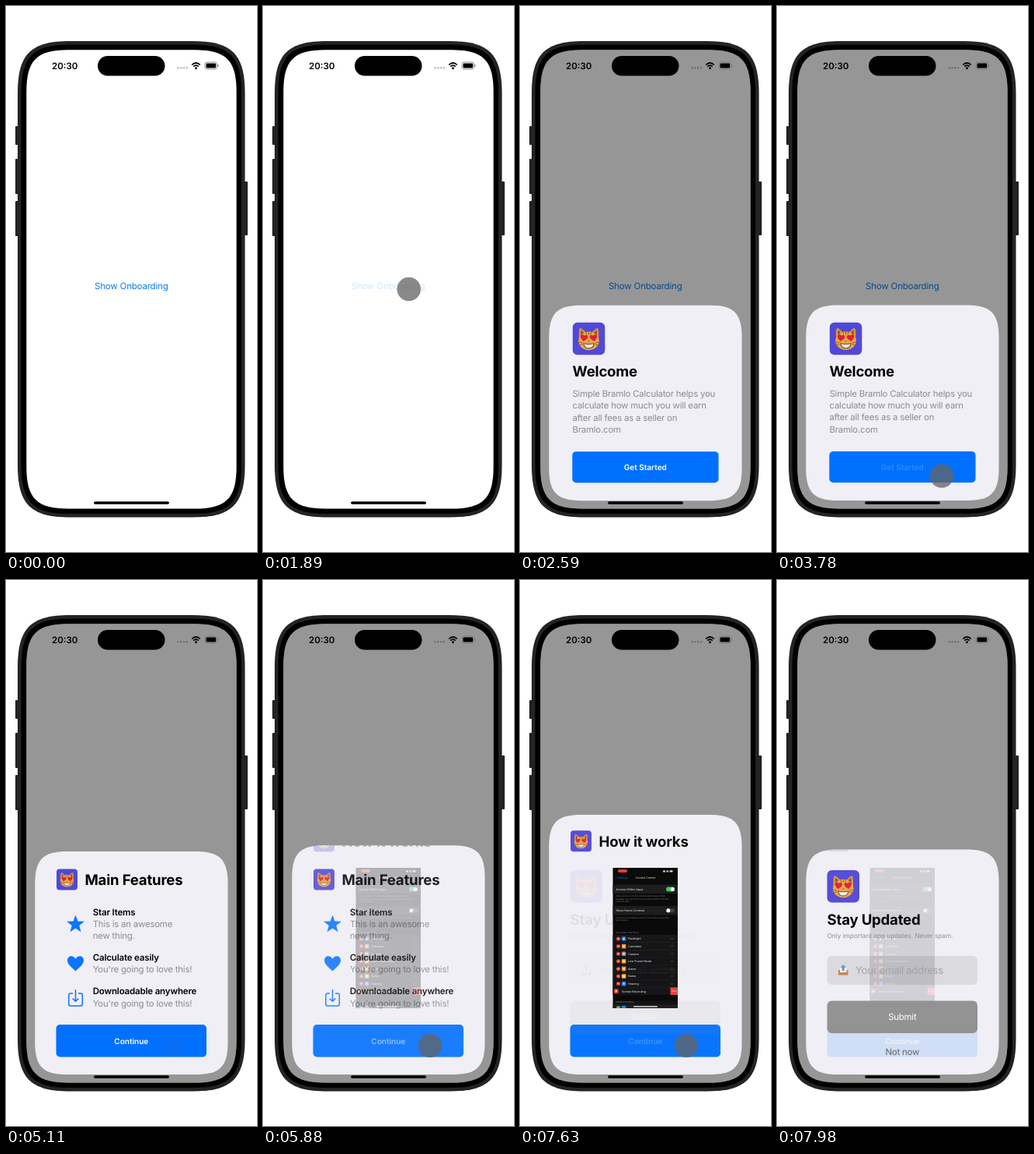
Write an HTML page that moves like this. It is 323x700 px and loops after 8 s.

```html
<!DOCTYPE html>
<html lang="en">
<head>
<meta charset="utf-8">
<title>Onboarding sheet</title>
<style>
  html, body { margin: 0; width: 100%; height: 100%; overflow: hidden; background: #fff; }
  svg { display: block; width: 323px; height: 700px; }
  text { font: 11.4px Inter, sans-serif; letter-spacing: -.2px; text-rendering: geometricPrecision; }
  .title { font-size: 18.6px; font-weight: 700; letter-spacing: -.2px; }
  .head { font-size: 11.5px; font-weight: 600; letter-spacing: -.17px; }
  .sub { fill: #8b8b90; }
  .button { font-size: 10px; font-weight: 600; letter-spacing: 0; fill: #fff; text-anchor: middle; }
  .mid { text-anchor: middle; }
  .tiny text { font-size: 3.7px; letter-spacing: 0; fill: #eee; }
  .tiny .note { font-size: 2.7px; fill: #77777b; }
</style>
</head>
<body>
<svg viewBox="0 0 323 700">
  <defs>
    <clipPath id="screenClip"><path id="screen"/></clipPath>
    <clipPath id="sheetClip"><path class="sheet"/></clipPath>
    <clipPath id="shot"><rect x="119.5" y="369" width="83.5" height="180"/></clipPath>
    <path id="heart" d="M0 9C-4 5-10 1-10-4C-10-10-3-11 0-6C3-11 10-10 10-4C10 1 4 5 0 9Z"/>
    <g id="icon">
      <rect width="41.5" height="41.5" rx="6" fill="#5148d8"/>
      <path d="M8.500 22Q7 10 9.500 7Q13 8 17 13H25Q28.500 8 32 7Q34.500 10 33 22Z" fill="#d9963c"/>
      <path d="M10.500 16L10.800 9.500L15 14ZM31 16L30.700 9.500L26.500 14Z" fill="#80502f"/>
      <ellipse cx="20.750" cy="23.500" rx="13.300" ry="11.800" fill="#e6a848"/>
      <path d="M20.750 12v4M17.500 12.500l.6 3M24 12.500l-.6 3M6.500 25l6 1M7 29l5.500-1M35 25l-6 1M34.500 29l-5.500-1" stroke="#8f5a28" stroke-width=".9"/>
      <use href="#heart" fill="#e3202f" transform="translate(14.500 20) rotate(8) scale(.48)"/>
      <use href="#heart" fill="#e3202f" transform="translate(27 20) rotate(-8) scale(.48)"/>
      <path d="M14 27Q20.750 28.500 27.500 27Q26.500 33 20.750 33Q15 33 14 27Z" fill="#f6efe6" stroke="#7a4a28" stroke-width="1.100"/>
      <path d="M19 23.500h3.500l-1.750 2Z" fill="#b8606a"/>
    </g>
  </defs>

  <g fill="#202224">
    <rect x="12" y="154" width="5" height="24" rx="1"/>
    <rect x="12" y="196" width="5" height="45" rx="1"/>
    <rect x="12" y="250" width="5" height="45" rx="1"/>
    <rect x="305" y="225" width="6" height="69" rx="1"/>
    <path id="frame" fill="#222526"/>
    <path id="bezel" fill="#000"/>
  </g>

  <g clip-path="url(#screenClip)">
    <rect x="26" y="56" width="271" height="589" fill="#fff"/>
    <text id="link" class="mid" x="161.300" y="363" fill="#0b7cf3" style="font-size:11.5px">Show Onboarding</text>
    <g fill="#bbb">
      <circle cx="221.500" cy="79.300" r="1.200"/><circle cx="225.300" cy="79.300" r="1.200"/>
      <circle cx="229.100" cy="79.300" r="1.200"/><circle cx="232.900" cy="79.300" r="1.200"/>
    </g>
    <rect id="dim" x="26" y="56" width="271" height="589"/>
    <text x="59" y="81" style="font-size:11.5px;font-weight:600;letter-spacing:0">20:30</text>
    <rect x="118" y="64" width="86.500" height="25.500" rx="12.750"/>
    <g fill="none" stroke="#000" stroke-width="1.700">
      <path d="M239.200 75.500Q244.500 70.500 249.800 75.500M241.200 77.700Q244.500 74.700 247.800 77.700"/>
      <circle cx="244.500" cy="79.800" r=".6"/>
      <rect x="256" y="72" width="15.500" height="9" rx="2.700" stroke="#777" stroke-width=".8"/>
      <rect x="258.300" y="74.300" width="11" height="4.400" rx=".5" fill="#000"/>
      <path d="M273 75v3" stroke="#777" stroke-width="1"/>
    </g>

    <g id="slide">
      <path class="sheet" fill="#f0eff5"/>
      <g clip-path="url(#sheetClip)">
        <g class="page">
          <use href="#icon" x="67.800" y="405.700"/>
          <text class="title" x="67.500" y="475.300">Welcome</text>
          <g class="sub">
            <text x="67.500" y="501">Simple Bramlo Calculator helps you</text>
            <text x="67.500" y="516.200">calculate how much you will earn</text>
            <text x="67.500" y="531.400">after all fees as a seller on</text>
            <text x="67.500" y="546.600">Bramlo.com</text>
          </g>
          <rect x="67.300" y="571" width="188.200" height="40" rx="5" fill="#0070ff"/>
          <text class="button label" x="161.300" y="594.600">Get Started</text>
        </g>

        <g class="page">
          <use href="#icon" transform="translate(65 370.500) scale(.65)"/>
          <text class="title" x="101.500" y="390.600">Main Features</text>
          <g fill="#0a75ff">
            <path id="star"/>
            <use href="#heart" transform="translate(89.500 492) scale(1.050)"/>
            <path d="M86 530H83Q80.800 530 80.800 532.500V543.500Q80.800 546 83 546H96Q98.300 546 98.300 543.500V532.500Q98.300 530 96 530H93M89.500 525V540M85.700 536.500L89.500 540.300L93.300 536.500" fill="none" stroke="#0a75ff" stroke-width="1.500"/>
          </g>
          <text class="head" x="111.700" y="429.600">Star Items</text>
          <text class="head" x="111.700" y="488">Calculate easily</text>
          <text class="head" x="111.700" y="531.300">Downloadable anywhere</text>
          <g class="sub">
            <text x="111.700" y="445">This is an awesome</text>
            <text x="111.700" y="460.200">new thing.</text>
            <text x="111.700" y="503.300">You're going to love this!</text>
            <text x="111.700" y="546.700">You're going to love this!</text>
          </g>
          <rect x="64.500" y="570" width="193.500" height="41.500" rx="5" fill="#0070ff"/>
          <text class="button label" x="161.300" y="594.600">Continue</text>
        </g>

        <g class="page">
          <use href="#icon" transform="translate(65 321.300) scale(.65)"/>
          <text class="title" x="101.500" y="341.600">How it works</text>
          <g class="tiny" clip-path="url(#shot)" id="phone"></g>
          <rect x="64.500" y="570" width="193.500" height="41.500" rx="5" fill="#0070ff"/>
          <text class="button label" x="161.300" y="594.600">Continue</text>
        </g>

        <g class="page">
          <use href="#icon" x="64.500" y="372"/>
          <text class="title" x="64.500" y="441.800">Stay Updated</text>
          <text class="sub" x="64.500" y="458.600" style="font-size:8.3px;letter-spacing:-.03px">Only important app updates. Never spam.</text>
          <rect x="64.500" y="482" width="193.500" height="37" rx="6" fill-opacity=".09"/>
          <path d="M79 500h12.500v6.500h-12.500z" fill="#c97f45"/>
          <path d="M81 497h8.500v6h-8.500z" fill="#f4f4f4"/>
          <path d="M85.200 493l3.600 4h-2v4h-3.200v-4h-2z" fill="#5d9ad0"/>
          <text x="101" y="504.700" fill="#a0a0a5" style="font-size:13.3px;letter-spacing:-.4px">Your email address</text>
          <rect x="64.500" y="539.500" width="193.500" height="41.500" rx="6" fill="#909090"/>
          <text class="mid" x="161.300" y="564.300" fill="#fff">Submit</text>
          <text class="mid" x="161.300" y="608.600" fill="#626268">Not now</text>
        </g>
      </g>
    </g>
    <rect id="homeBar" x="113" y="635.200" width="97" height="3.600" rx="1.800"/>
    <circle id="touch" r="15.300" fill="#646464"/>
  </g>
</svg>
<script>
const $ = id => document.getElementById(id);
const all = selector => [...document.querySelectorAll(selector)];

// Rectangle whose corners ease into the sides
function smoothRect(x, y, w, h, r) {
  const e = r * 1.35, c = r * .33, X = x + w, Y = y + h;
  return `M${x + e} ${y}H${X - e}C${X - c} ${y} ${X} ${y + c} ${X} ${y + e}` +
    `V${Y - e}C${X} ${Y - c} ${X - c} ${Y} ${X - e} ${Y}` +
    `H${x + e}C${x + c} ${Y} ${x} ${Y - c} ${x} ${Y - e}` +
    `V${y + e}C${x} ${y + c} ${x + c} ${y} ${x + e} ${y}Z`;
}
$('frame').setAttribute('d', smoothRect(15, 45, 292.5, 610.5, 50));
$('bezel').setAttribute('d', smoothRect(19.5, 49.5, 283.5, 601.5, 46));
$('screen').setAttribute('d', smoothRect(26.3, 56.3, 270.3, 588.3, 40));

// Five-pointed star
$('star').setAttribute('d', 'M' + Array.from({ length: 10 }, (_, i) => {
  const r = i % 2 ? 5 : 12, a = i * Math.PI / 5;
  return `${89.5 + r * Math.sin(a)} ${441.5 - r * Math.cos(a)}`;
}).join('L') + 'Z');

// Settings screenshot
const rect = (x, y, w, h, fill, rx = 0) => `<rect x="${x}" y="${y}" width="${w}" height="${h}" rx="${rx}" fill="${fill}"/>`;
const dot = (x, y, r, fill) => `<circle cx="${x}" cy="${y}" r="${r}" fill="${fill}"/>`;
const label = (x, y, s, attrs = '') => `<text x="${x}" y="${y}" ${attrs}>${s}</text>`;
const note = (y, s) => label(123.5, y, s, 'class="note"');
const toggle = (y, fill, knob) => rect(188, y - 2.8, 11, 5.6, fill, 2.8) + dot(knob, y, 2.5, '#fff');
const rows = [['Flashlight', '#1479f0'], ['Calculator', '#f08a20'], ['Camera', '#8a8a90'], ['Low Power Mode', '#f0a020'],
  ['Alarm', '#f08a20'], ['Notes', '#f0b428'], ['Hearing', '#1479f0']];
$('phone').innerHTML =
  rect(119.5, 369, 83.5, 180, '#020203') + rect(126, 371, 12, 4, '#e8332c', 2) +
  rect(184, 372.5, 3, 2, '#ddd') + rect(188.5, 372.5, 2.5, 2, '#ddd') + rect(192.5, 372.3, 4, 2.2, '#ddd', .5) +
  label(161.3, 383.3, 'Control Center', 'text-anchor="middle" font-weight="700"') +
  label(122, 383.3, '‹ Settings', 'style="fill:#1260b8"') +
  rect(119.5, 390.5, 83.5, 11.5, '#151517') + label(123.5, 397.8, 'Access Within Apps') + toggle(396.4, '#34c759', 196.2) +
  note(406, 'Allow access to Control Center within apps. When') +
  note(409.7, 'disabled, you can still access Control Center from the') + note(413.4, 'Home Screen.') +
  rect(119.5, 418, 83.5, 11.5, '#151517') + label(123.5, 425.2, 'Show Home Controls') + toggle(423.8, '#39393d', 190.8) +
  note(433.5, 'Include recommended controls for Home accessories') + note(437.2, 'and scenes.') +
  note(452.5, 'INCLUDED CONTROLS') + rect(119.5, 455, 83.5, 77, '#0e0e10') +
  rows.map(([name, color], i) => {
    const y = 460 + i * 9.6;
    return dot(126.5, y, 2.5, '#ec3b30') + rect(125.2, y - .3, 2.6, .6, '#fff') + rect(130.8, y - 2.8, 5.6, 5.6, color, 1.2) +
      dot(133.6, y, 1.1, '#fff') + label(139, y + 1.3, name) +
      rect(193.5, y - 1, 4, .5, '#444') + rect(193.5, y + .6, 4, .5, '#444') + rect(139, y + 4.7, 64, .25, '#2c2c2e');
  }).join('') +
  rect(121, 524.3, 5.6, 5.6, '#ec3b30', 1.2) + dot(123.8, 527.1, 1.1, '#fff') + label(131, 528.5, 'Screen Recording') +
  rect(193.5, 522.3, 10, 9.7, '#ec3b30') + label(195, 528.4, 'Rem', 'style="font-size:3.2px"') +
  note(542, 'MORE CONTROLS') + rect(119.5, 544.5, 83.5, 6, '#0e0e10') +
  dot(126.5, 548.5, 2.5, '#34c759') + rect(130.8, 545.7, 5.6, 5, '#1479f0', 1.2) + rect(146, 546.2, 31, 1.2, '#fff', .6);

// Timing in ms: when the sheet appears, then each change of page
const LOOP = 8000, BOTTOM = 634;
const OPEN = 1900, CHANGES = [3850, 5810, 7600];
const TOPS = [383.5, 348, 299, 351];
const TAPS = [
  { from: 950, release: OPEN, x: 187.7, y: 363 },
  { from: 3280, release: CHANGES[0], x: 212, y: 602.5 },
  { from: 5080, release: CHANGES[1], x: 215, y: 597 },
  { from: 7000, release: CHANGES[2], x: 214, y: 597 },
];

const ramp = (t, a, b) => {
  const p = Math.min(1, Math.max(0, (t - a) / (b - a)));
  return p * p * (3 - 2 * p);
};
const spring = (ms, rate) => {
  const x = Math.max(0, ms) / 1000 * rate;
  return 1 - (1 + x) * Math.exp(-x);
};
const pressed = (t, release) => 1 - .82 * (ramp(t, release - 220, release - 90) - ramp(t, release, release + 250));

const pages = all('.page'), labels = all('.label'), sheets = all('.sheet');

function draw(t) {
  $('link').setAttribute('opacity', pressed(t, OPEN));
  $('dim').setAttribute('opacity', .41 * spring(t - OPEN, 20));
  $('slide').setAttribute('transform', `translate(0 ${284 * (1 - spring(t - OPEN, 14.6))})`);

  const top = CHANGES.reduce((y, at, i) => y + (TOPS[i + 1] - TOPS[i]) * spring(t - at, 10), TOPS[0]);
  const outline = smoothRect(37.3, top, 248.2, BOTTOM - top, 31);
  sheets.forEach(s => s.setAttribute('d', outline));

  // A new page appears faster than the old one leaves
  const fade = (i, rate) => spring(t - CHANGES[i], rate);
  pages.forEach((page, i) => {
    const shown = (i ? fade(i - 1, 14) : 1) * (i < 3 ? 1 - fade(i, 9.2) : 1);
    page.setAttribute('opacity', shown < .004 ? 0 : shown);
  });
  labels.forEach((l, i) => l.setAttribute('opacity', pressed(t, CHANGES[i])));

  const bar = CHANGES.reduce((v, at) => v + ramp(t, at + 390, at + 520) - ramp(t, at + 720, at + 910), 0);
  const grey = 100 * bar;
  $('homeBar').setAttribute('fill', `rgb(${grey},${grey},${grey})`);

  const tap = TAPS.find(p => t < p.release + 380) || TAPS[3];
  const approach = tap === TAPS[0] ? 1 - ramp(t, 1000, 1600) : 0;
  $('touch').setAttribute('cx', tap.x + 21 * approach);
  $('touch').setAttribute('cy', tap.y + 48.5 * approach);
  $('touch').setAttribute('opacity', .76 * (ramp(t, tap.from, tap.from + 180) - ramp(t, tap.release + 80, tap.release + 330)));
}

function loop() {
  draw(performance.now() % LOOP);
  requestAnimationFrame(loop);
}
loop();
</script>
</body>
</html>
```
